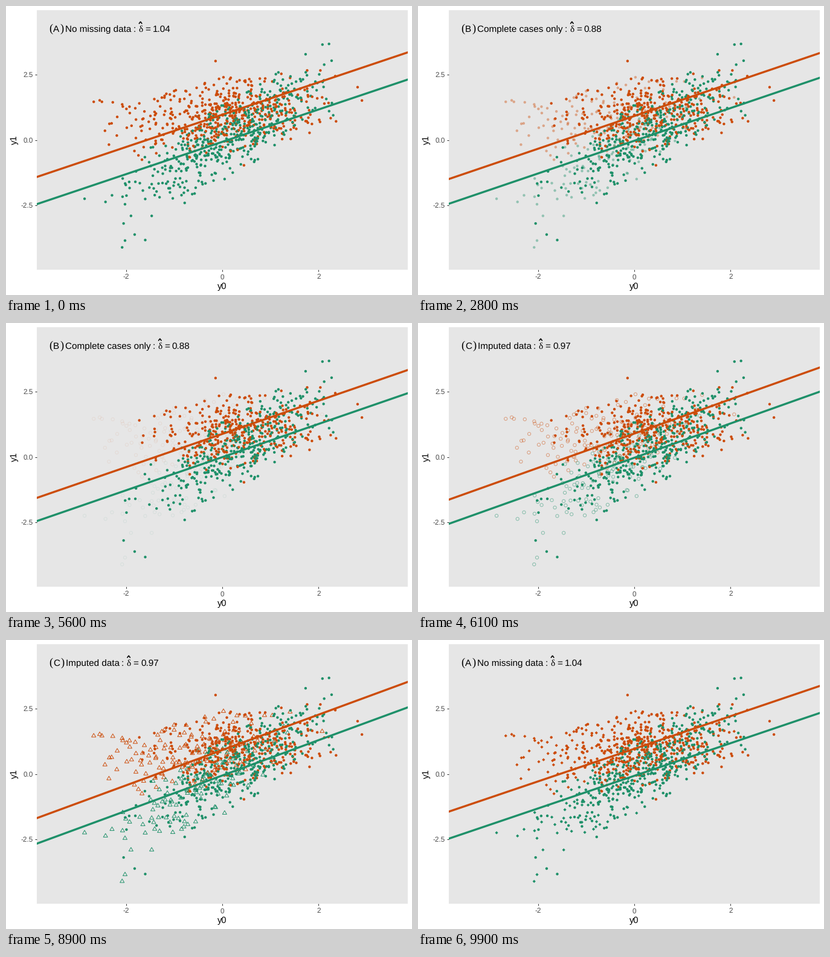
These frames come from a looping animation (672x480 px, 10 s). A matplotlib script:

```python
import numpy as np
import matplotlib.pyplot as plt
from matplotlib.animation import FuncAnimation
from matplotlib.colors import to_rgba
from matplotlib.patches import Rectangle
from matplotlib.path import Path

plt.rcParams["text.hinting"] = "none"

W, H, DPI = 672, 480, 96
PX = 72 / DPI                       # points per pixel
LEFT, RIGHT, TOP, BOTTOM = 51.2, 664.7, 7.4, 437.6
X0, Y0, XU, YU = 358.0, 222.5, 79.7, 43.4   # data origin and unit, in pixels
RED, GREEN = "#cc4c0a", "#1e9069"
SANS, SERIF = "Liberation Sans", "Liberation Serif"
R = 2.6                             # symbol radius
STEPS = 12
STARTS = (21, 55, 88)               # last still frame before each transition

# letter, label, label start and end, slope, green intercept, gap to red
STATES = [("A", "No missing data", 98, 206, 0.619, -0.072, 1.04),
          ("B", "Complete cases only", 98, 238.2, 0.631, -0.002, 0.88),
          ("C", "Imputed data", 99, 186.5, 0.682, -0.058, 0.97)]

# per arm: intercept, slope, steepness of loss, outliers kept and lost (y0, y1)
ARMS = {RED: (0.95, 0.21, 1.3,
              [(2.90, 1.51), (2.81, 2.02), (-0.14, 3.02), (0.45, -0.97)],
              [(-2.67, 1.46), (-2.50, 1.46)]),
        GREEN: (-0.06, 1.03, 1.0,
                [(-1.82, -3.62), (-1.60, -3.83), (2.08, 3.65), (1.73, 3.28)],
                [(-2.08, -4.11), (-2.02, -3.85), (-2.86, -2.25)])}


def simulate(rng, n, base, slope, drop):
    """Draw n points of one arm; low y0 values are lost more often."""
    x = rng.normal(0.14, 1.02, 2 * n)
    e = rng.normal(0, 0.72, 2 * n)
    ok = (x > -2.6) & (x < 2.4) & (np.abs(e) < 1.55)
    x, e = x[ok][:n], e[ok][:n]
    lost = rng.random(n) < 1 / (1 + np.exp(1.3 + drop * x))
    return np.column_stack([x, base + slope * x + e]), lost


def build_cloud(n=490):
    rng = np.random.default_rng(17)
    pos, col, lost = [], [], []
    for colour, (base, slope, drop, kept, gone) in ARMS.items():
        pts, miss = simulate(rng, n, base, slope, drop)
        pos += [pts, kept, gone]
        lost += [miss, [False] * len(kept), [True] * len(gone)]
        col += [to_rgba(colour)] * (n + len(kept) + len(gone))
    pos = np.array([X0, Y0]) + np.vstack(pos) * [XU, -YU]
    lost, col = np.concatenate(lost).astype(bool), np.array(col)
    order = rng.permutation(len(pos))
    return pos[order], col[order], lost[order]


def poly(*pts):
    return Path(np.array(pts + (pts[0],)) * R, closed=True)


def segs(*pts):
    codes = [Path.MOVETO, Path.LINETO] * (len(pts) // 2)
    return Path(np.array(pts) * R, codes)


def join(*paths):
    return Path.make_compound_path(*paths)


def diamond(d):
    return poly((-d, 0), (0, d), (d, 0), (0, -d))


def plus(d):
    return segs((-d, 0), (d, 0), (0, -d), (0, d))


ROOT2 = 2 ** 0.5
TRIANGLE = poly((0, 1.555), (1.347, -0.778), (-1.347, -0.778))
BOX = poly((-1, -1), (1, -1), (1, 1), (-1, 1))
CROSS = segs((-1, -1), (1, 1), (-1, 1), (1, -1))
RING = Path.circle((0, 0), R)
DOT = Path.circle((0, 0), 2.2)
# plotting symbols by number; those in SOLID are filled
SHAPES = {1: RING, 2: TRIANGLE, 4: CROSS, 5: diamond(ROOT2),
          7: join(BOX, CROSS), 8: join(CROSS, plus(ROOT2)),
          10: join(RING, plus(1)), 12: join(BOX, plus(1)),
          13: join(RING, CROSS), 15: BOX, 16: RING, 18: diamond(1), 20: DOT}
SOLID = {15, 16, 18, 20}

fig = plt.figure(figsize=(W / DPI, H / DPI), dpi=DPI, facecolor="white")
ax = fig.add_axes([0, 0, 1, 1])
ax.set(xlim=(0, W), ylim=(H, 0))
ax.axis("off")
panel = Rectangle((LEFT, TOP), RIGHT - LEFT, BOTTOM - TOP, fc="#e6e6e6", lw=0)
ax.add_patch(panel)


def label(x, y, s, size, font=SANS, **kw):
    kw = {"va": "baseline", "color": "black", **kw}
    return ax.text(x, y, s, fontsize=size * PX, family=font, **kw)


def stroke(xs, ys, color, width, **kw):
    return ax.plot(xs, ys, color=color, lw=width * PX,
                   solid_capstyle="butt", **kw)[0]


for v in (-2, 0, 2):
    x = X0 + XU * v
    stroke([x, x], [BOTTOM, BOTTOM + 3.7], "#333333", 1.07)
    label(x, 453.4, str(v), 11.73, ha="center", color="#4d4d4d")
for v in (-2.5, 0, 2.5):
    y = Y0 - YU * v
    stroke([LEFT - 3.7, LEFT], [y, y], "#333333", 1.07)
    label(44.8, y + 4.2, f"{v:.1f}", 11.73, ha="right", color="#4d4d4d")
label(X0, 470, "y0", 14.67, ha="center")
label(18.3, Y0, "y1", 14.67, ha="center", rotation=90, rotation_mode="anchor")

points, colours, lost = build_cloud()


def cloud(mask, z):
    dots = ax.scatter(*points[mask].T, s=PX ** 2, c=colours[mask],
                      linewidths=0, zorder=z)
    dots.set_paths([DOT])
    return dots


cloud(~lost, 4)
gone = cloud(lost, 3)
lines = [stroke([], [], c, 3.4, zorder=5) for c in (RED, GREEN)]
for line in lines:
    line.set_clip_path(panel)

label(71.2, 43, "(", 18.5, SERIF)
letter = label(78, 43, "", 15.2)
close = label(0, 43, ")", 18.5, SERIF)
name = label(0, 43, "", 15.2)
colon = label(0, 43, ":", 15.2)
delta = label(0, 43, "δ", 15.2, SERIF)
equals = label(0, 43, "=", 15.2)
value = label(0, 43, "", 15.2)
hat = stroke([], [], "black", 1.6, solid_joinstyle="miter")


def set_title(state):
    key, words, start, end, *_, gap = STATES[state]
    letter.set_text(key)
    name.set_text(words)
    value.set_text(f"{gap:.2f}")
    close.set_x(start - 8.6)
    name.set_x(start)
    for part, dx in ((colon, 4.2), (delta, 13.2), (equals, 24), (value, 36.6)):
        part.set_x(end + dx)
    hat.set_data(end + 16.6 + np.array([-2.6, 0, 2.6]), [29.6, 26, 29.6])


def phase(i):
    """Index of the current transition and its progress from 0 to 1."""
    state, t = 0, 0.0
    for s, start in enumerate(STARTS):
        if i > start:
            state, t = s, min(1.0, (i - start) / STEPS)
    return state, t


def draw(i):
    state, t = phase(i)
    after = (state + 1) % 3

    fits = np.array([STATES[state][4:], STATES[after][4:]])
    slope, base, gap = (1 - t) * fits[0] + t * fits[1]
    xs = np.array([LEFT - 6, RIGHT + 6])
    for line, level in zip(lines, (base + gap, base)):
        line.set_data(xs, Y0 - YU * (level + slope * (xs - X0) / XU))

    pch, alpha = ((20, 1 - t), (1, t), (int(1 + 19 * t), 1))[state]
    rgba = colours[lost].copy()
    rgba[:, 3] = alpha
    solid = pch in SOLID
    gone.set_paths([SHAPES[pch]])
    gone.set_facecolor(rgba if solid else "none")
    gone.set_edgecolor("none" if solid else rgba)
    gone.set_linewidth(0 if solid else 0.95 * PX)
    gone.set_visible(alpha > 0)

    set_title(after if t >= 0.5 else state)
    return [gone, *lines]


anim = FuncAnimation(fig, draw, frames=100, interval=100, repeat=True,
                     repeat_delay=0, blit=False)
plt.show()
```
